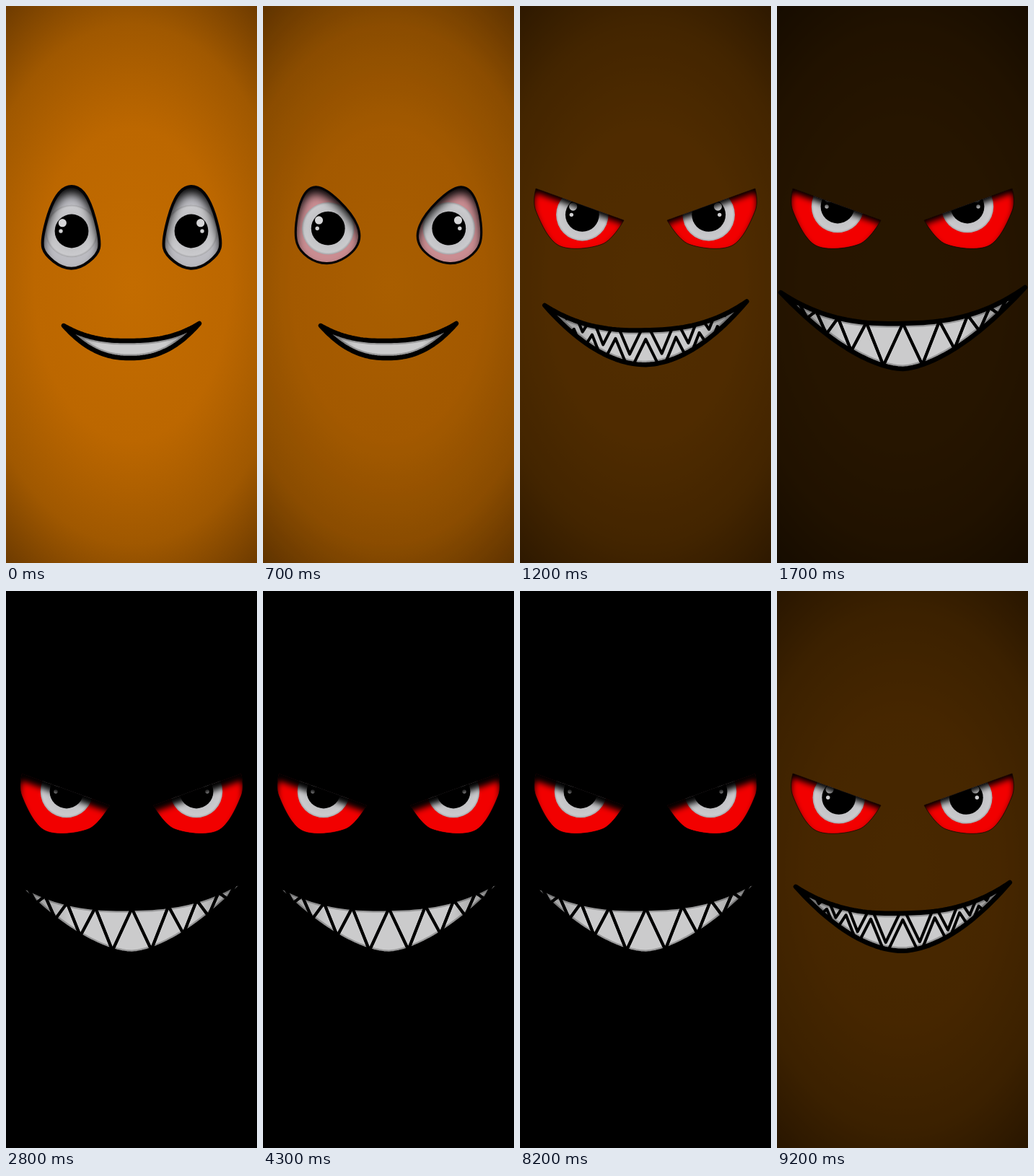
Recreate the animation shown at these times as an HTML page. Size 348x772 px, loop 9300 ms.

```html
<!DOCTYPE html>
<html lang="en">
<head>
<meta charset="utf-8">
<title>Mood face</title>
<style>
  html, body { margin: 0; width: 100%; height: 100%; overflow: hidden; background: #000; }
  svg { display: block; width: 100%; height: 100%; }
</style>
</head>
<body>
<svg viewBox="0 0 348 772" preserveAspectRatio="none">
  <defs>
    <radialGradient id="skin" gradientUnits="userSpaceOnUse" cx="0" cy="0" r="1"
      gradientTransform="translate(174 386) scale(300 480)">
      <stop offset="0" stop-color="#c36c00"/>
      <stop offset=".45" stop-color="#bc6700"/>
      <stop offset=".75" stop-color="#a05800"/>
      <stop offset="1" stop-color="#6c3a00"/>
    </radialGradient>
    <radialGradient id="ringFill">
      <stop offset=".6" stop-color="#c2c2c5"/>
      <stop offset=".92" stop-color="#cacacd"/>
      <stop offset="1" stop-color="#a4a4a7"/>
    </radialGradient>
    <linearGradient id="teethFill">
      <stop offset="0" stop-color="#777"/>
      <stop offset=".25" stop-color="#cbcbcc"/>
      <stop offset=".75" stop-color="#cbcbcc"/>
      <stop offset="1" stop-color="#777"/>
    </linearGradient>
    <filter id="soft" filterUnits="userSpaceOnUse" x="-40" y="190" width="260" height="240">
      <feGaussianBlur id="blur"/>
    </filter>
    <clipPath id="eyeClip"><path class="eye"/></clipPath>
    <clipPath id="mouthClip"><path class="mouth"/></clipPath>
  </defs>

  <rect width="348" height="772" fill="url(#skin)"/>
  <rect id="dark" width="348" height="772"/>

  <g id="eye">
    <g clip-path="url(#eyeClip)">
      <path id="white" class="eye"/>
      <g id="iris">
        <circle r="36.3" fill="url(#ringFill)"/>
        <circle r="23.4"/>
        <circle cx="-12.7" cy="-11.3" r="5.6" fill="#d6d6d8"/>
        <circle cx="-15" r="2.7" fill="#d0d0d2"/>
      </g>
      <g filter="url(#soft)"><path id="shade" fill-rule="evenodd"/></g>
    </g>
    <path id="rim" class="eye" fill="none" stroke="#040406" stroke-linejoin="round"/>
  </g>
  <use href="#eye" transform="translate(348 0) scale(-1 1)"/>

  <path class="mouth" fill="url(#teethFill)"/>
  <g clip-path="url(#mouthClip)" fill="none" stroke="#000" stroke-linejoin="round">
    <path class="mouth" stroke-width="11" stroke-opacity=".25"/>
    <g id="teeth" stroke-width="4">
      <path/>
      <path/>
    </g>
  </g>
  <path class="mouth" fill="none" stroke="#000" stroke-width="6.5" stroke-linejoin="round"/>
</svg>

<script>
const LOOP = 9300, STEP = 100;
const $ = id => document.getElementById(id);
const mix = (a, b, p) => a + (b - a) * p;
const ramp = (t, from, to) => Math.min(1, Math.max(0, (t - from) / (to - from)));
const setPath = (name, d) =>
  document.querySelectorAll('.' + name).forEach(el => el.setAttribute('d', d));

// Key points of the left eye: two lid ends, then clockwise round the bottom.
const EYE = {
  calm: [[91, 250], [126, 306], [115, 354], [66, 354], [54, 306]],
  evil: [[22, 253], [144, 297], [114, 330], [54, 332], [22, 284]]
};
const MOUTH = {
  calm: { cx: 174, half: 94, tip: 441.5, tilt: -1.5, top: 22.5, bottom: 46.5, bend: 2.3 },
  evil: { cx: 174.5, half: 169.5, tip: 393.5, tilt: -3.5, top: 46.5, bottom: 109.5, bend: 1.65 }
};

// Closed spline through the key points; the lid ends sharpen as p grows.
function eyePath(p) {
  const pts = EYE.calm.map((c, i) => c.map((v, j) => mix(v, EYE.evil[i][j], p)));
  const at = i => pts[(i + pts.length) % pts.length];
  const handle = (i, side) => {
    const k = side * mix(1.6, i % pts.length < 2 ? 0 : 1, p) / 6;
    return at(i).map((v, j) => v + (at(i + 1)[j] - at(i - 1)[j]) * k);
  };
  return 'M' + at(0) + pts.map((_, i) =>
    `C${handle(i, 1)} ${handle(i + 1, -1)} ${at(i + 1)}`).join('') + 'Z';
}

// Mouth edges as functions of u, from -1 at the left tip to 1 at the right.
function mouthShape(p) {
  const m = {};
  for (const key in MOUTH.calm) m[key] = mix(MOUTH.calm[key], MOUTH.evil[key], p);
  const edge = (u, sag, power) =>
    [m.cx + u * m.half, m.tip + m.tilt * u + sag * (1 - Math.abs(u) ** power)];
  return {
    top: u => edge(u, m.top, 2.5),
    bottom: u => edge(u, m.bottom, m.bend)
  };
}

function mouthPath({ top, bottom }) {
  const us = Array.from({ length: 49 }, (_, i) => i / 24 - 1);
  return 'M' + [...us.map(top), ...us.reverse().map(bottom)].join('L') + 'Z';
}

// Teeth narrow by a constant ratio away from the middle.
function zigzag({ top, bottom }, dy) {
  const points = [];
  for (let k = -9; k <= 9; k++) {
    const n = Math.abs(k);
    const u = Math.sign(k) * 0.159 * (1 - 0.88 ** n) / 0.12;
    const [x, y] = (n % 2 ? bottom : top)(u);
    points.push([x, y + dy]);
  }
  return 'M' + points.join('L');
}

function light(m) {
  const fall = 0.865 ** (ramp(m, 600, 1700) * 11);
  return fall * (1 - ramp(m, 1700, 2600)) ** 1.5;
}

function drawEyes(m) {
  const p = ramp(m, 600, 1000), look = ramp(m, 600, 1500);
  const d = eyePath(p);
  setPath('eye', d);
  const rgb = [mix(188, 242, p), mix(188, 0, p), mix(194, 0, p)].map(Math.round);
  $('white').setAttribute('fill', `rgb(${rgb})`);
  $('rim').setAttribute('stroke-width', mix(4, 0.6, p));
  $('iris').setAttribute('transform', `translate(${mix(91, 84, look)} ${mix(312, 278, look)})`);
  const drop = mix(10, 6, p) + 4 * ramp(m, 1700, 2600);
  $('shade').setAttribute('d', 'M-60 150H260V460H-60Z' + d);
  $('shade').setAttribute('transform', `translate(0 ${drop})`);
  $('blur').setAttribute('stdDeviation', mix(7, 4, p));
}

function drawMouth(m) {
  const p = 1 - (1 - ramp(m, 850, 1600)) ** 1.5;
  const shape = mouthShape(p);
  setPath('mouth', mouthPath(shape));
  // Upper and lower teeth part vertically until the jaw is fully set.
  const gap = 32 * (1 - p);
  [...$('teeth').children].forEach((row, i) =>
    row.setAttribute('d', zigzag(shape, i ? gap : -gap)));
  $('teeth').setAttribute('opacity', ramp(p, 0.1, 0.6));
}

// The mood runs forward to full dark, rests, then runs partway back.
function draw(t) {
  const m = t < 8200 ? Math.min(t, 2600) : 2600 - 1.32 * (t - 8200);
  $('dark').setAttribute('opacity', 1 - light(m));
  drawEyes(m);
  drawMouth(m);
}

const start = performance.now();
function tick(now) {
  const t = Math.max(0, now - start) % LOOP;
  draw(Math.floor(t / STEP) * STEP);
  requestAnimationFrame(tick);
}
draw(0);
requestAnimationFrame(tick);
</script>
</body>
</html>
```
